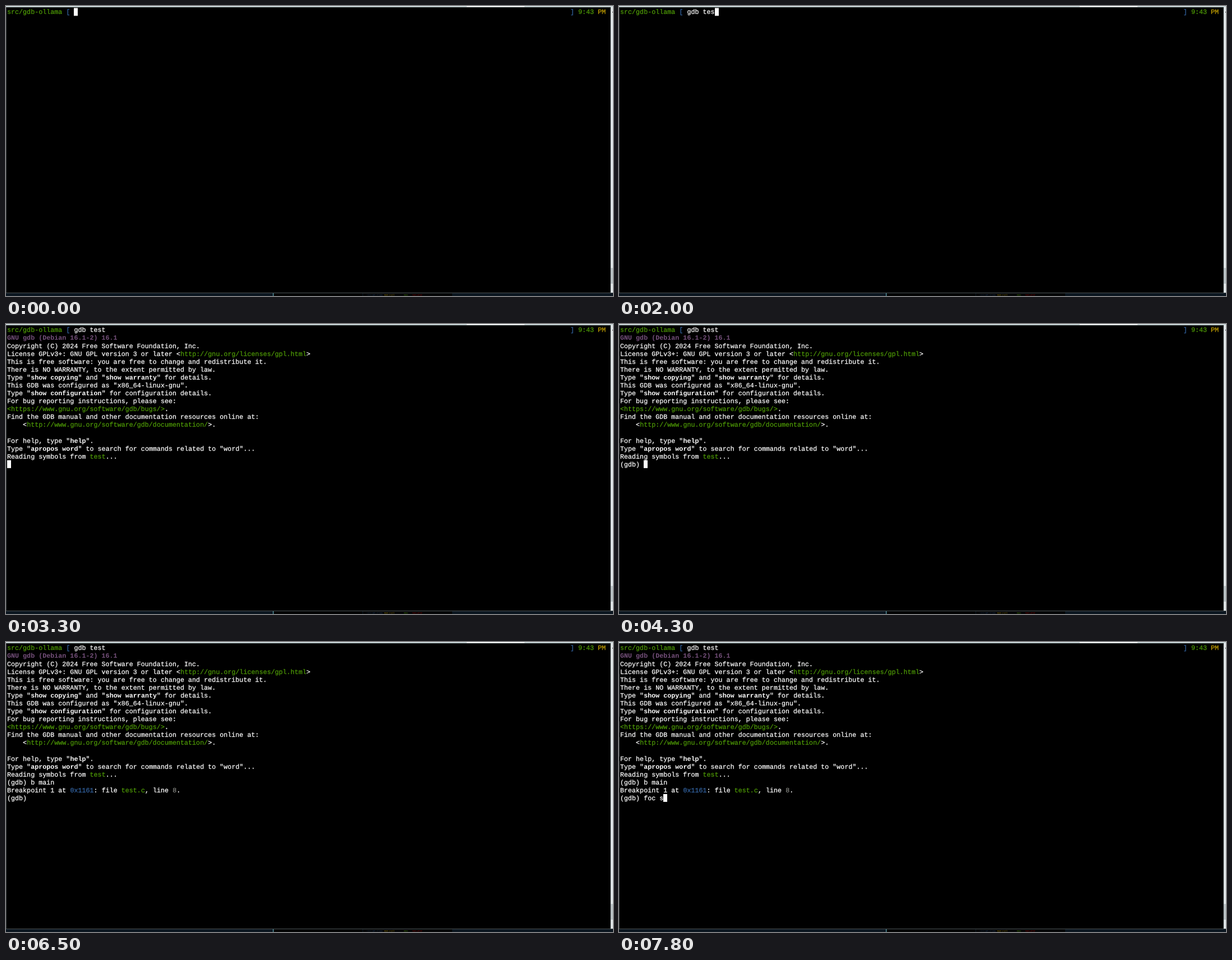
These frames come from a looping animation (1083 px wide and 517 px high, 8 s). An HTML page:

```html
<!DOCTYPE html>
<html lang="en">
<head>
<meta charset="utf-8">
<title>Terminal session</title>
<style>
html, body { margin: 0; width: 100%; height: 100%; overflow: hidden; background: #000; }
svg { display: block; width: 1083px; height: 517px; }
text {
  font-family: "Liberation Mono", monospace;
  font-size: 11.715px;
  color: #fff;
  fill: currentColor;
  stroke: currentColor;
  stroke-width: .25px;
  white-space: pre;
  text-rendering: geometricPrecision;
}
.g { color: #4e9a06; }
.b { color: #3465a4; }
.y { color: #c4a000; }
.n { color: #888a85; }
.r { color: #cc0000; }
.p { color: #75507b; }
.p, .w { font-weight: bold; stroke: none; }
.tiny text { font-size: 3px; stroke: none; }
.tiny .b { opacity: .6; }
</style>
</head>
<body>
<svg id="stage" viewBox="0 0 1083 517">
  <rect width="1083" height="517" fill="#000"/>
  <g id="frame">
    <rect width="1083" height="2" fill="#ccd8da"/>
    <rect x="822" width="103" height="2" fill="#f6f9fa"/>
    <rect y="2" width="1079" height="1" fill="#28302f"/>
    <rect y="2" width="1" height="510" fill="#3a3f40"/>
    <rect x="1078" y="2" width="1" height="510" fill="#3a3f40"/>
    <rect x="1079" y="2" width="4" height="510" fill="#dfe5e7"/>
    <rect x="1079" y="467" width="4" height="28" fill="#b9c2c5"/>
    <rect x="1082" y="10" width="1" height="2" fill="#555"/>
    <rect y="511" width="1083" height="1" fill="#4b5254"/>
    <rect y="512" width="1083" height="5" fill="#0b1620"/>
    <rect x="476" y="512" width="1.5" height="5" fill="#4f8790"/>
    <rect x="478" y="512" width="158" height="5" fill="#020303"/>
    <rect x="637" y="512" width="159" height="5" fill="#050607"/>
  </g>
  <g class="tiny">
    <text class="b" x="643" y="515.5">~/src/gdb-ollama</text>
    <text class="y" x="675" y="515.5">main.c:all</text>
    <text class="g" x="710" y="515.5">make</text>
    <text class="r" x="725" y="515.5">test_error</text>
  </g>
  <g id="screen"></g>
  <rect id="cursor" width="7" height="14" fill="#fff"/>
</svg>
<script>
const LOOP = 8000, CELL_W = 7.027, CELL_H = 14.08, LEFT = 2, TOP = 3.5, BASELINE = 10.9;
const screenEl = document.getElementById('screen');
const cursor = document.getElementById('cursor');
const colX = col => LEFT + col * CELL_W;
const rowY = row => TOP + row * CELL_H;

// Blocks of output: first row, time shown, lines. {x:...} applies style x.
const output = [
  { row: 0, at: 0, lines: [
    '{g:src/gdb-ollama} {b:[}' + ' '.repeat(127) + '{b:]} {g:9:43} {y:PM}'
  ] },
  { row: 1, at: 3300, lines: [
    '{p:GNU gdb (Debian 16.1-2) 16.1}',
    'Copyright (C) 2024 Free Software Foundation, Inc.',
    'License GPLv3+: GNU GPL version 3 or later <{g:http://gnu.org/licenses/gpl.html}>',
    'This is free software: you are free to change and redistribute it.',
    'There is NO WARRANTY, to the extent permitted by law.',
    'Type "{w:show copying}" and "{w:show warranty}" for details.',
    'This GDB was configured as "x86_64-linux-gnu".',
    'Type "{w:show configuration}" for configuration details.',
    'For bug reporting instructions, please see:',
    '{g:<https://www.gnu.org/software/gdb/bugs/>}.',
    'Find the GDB manual and other documentation resources online at:',
    '    <{g:http://www.gnu.org/software/gdb/documentation/}>.',
    '',
    'For help, type "{w:help}".',
    'Type "{w:apropos word}" to search for commands related to "word"...',
    'Reading symbols from {g:test}...'
  ] },
  { row: 17, at: 4000, lines: ['(gdb)'] },
  { row: 18, at: 6000, lines: [
    'Breakpoint 1 at {b:0x1161}: file {g:test.c}, line {n:8}.',
    '(gdb)'
  ] }
];

// Where the cursor sits; "<" in keys is a backspace.
const inputs = [
  { row: 0, col: 17, at: 0, keys: 'gdb test', times: [600, 900, 1200, 1300, 1500, 1800, 2000, 2200] },
  { row: 1, col: 0, at: 3200 },
  { row: 17, col: 0, at: 3300 },
  { row: 17, col: 6, at: 4000, keys: 'b main', times: [4600, 4700, 5000, 5100, 5300, 5600] },
  { row: 18, col: 0, at: 5900 },
  { row: 19, col: 6, at: 6000, keys: 'fo c<<c s', times: [6800, 6900, 7000, 7100, 7300, 7500, 7600, 7700, 7800] }
];
const cursorOff = [[100, 600], [2800, 3100], [3700, 4300], [6500, 6800]];

function addText(parent, row, col, str, style) {
  const el = document.createElementNS('http://www.w3.org/2000/svg', 'text');
  el.setAttribute('x', colX(col));
  el.setAttribute('y', rowY(row) + BASELINE);
  if (style) el.setAttribute('class', style);
  el.textContent = str;
  parent.appendChild(el);
  return el;
}

function addLine(parent, row, line) {
  let col = 0;
  for (const [, style, styled, plain] of line.matchAll(/\{(\w):([^}]*)\}|([^{]+)/g)) {
    const str = styled ?? plain;
    if (str.trim()) addText(parent, row, col, str, style);
    col += str.length;
  }
}

function typed(input, t) {
  let str = '';
  (input.times || []).forEach((time, i) => {
    if (t < time) return;
    const key = input.keys[i];
    str = key === '<' ? str.slice(0, -1) : str + key;
  });
  return str;
}

for (const block of output) {
  block.el = document.createElementNS('http://www.w3.org/2000/svg', 'g');
  block.lines.forEach((line, i) => addLine(block.el, block.row + i, line));
  screenEl.appendChild(block.el);
}
for (const input of inputs) input.el = addText(screenEl, input.row, input.col, '');

function render(t) {
  for (const block of output) block.el.setAttribute('visibility', t >= block.at ? 'visible' : 'hidden');
  for (const input of inputs) {
    const str = typed(input, t);
    if (input.el.textContent !== str) input.el.textContent = str;
    if (t >= input.at) {
      cursor.setAttribute('x', Math.round(colX(input.col + str.length)));
      cursor.setAttribute('y', rowY(input.row));
    }
  }
  const off = cursorOff.some(([from, to]) => t >= from && t < to);
  cursor.setAttribute('visibility', off ? 'hidden' : 'visible');
}

const start = performance.now();
function tick() {
  render((performance.now() - start) % LOOP);
  requestAnimationFrame(tick);
}
tick();
</script>
</body>
</html>
```
